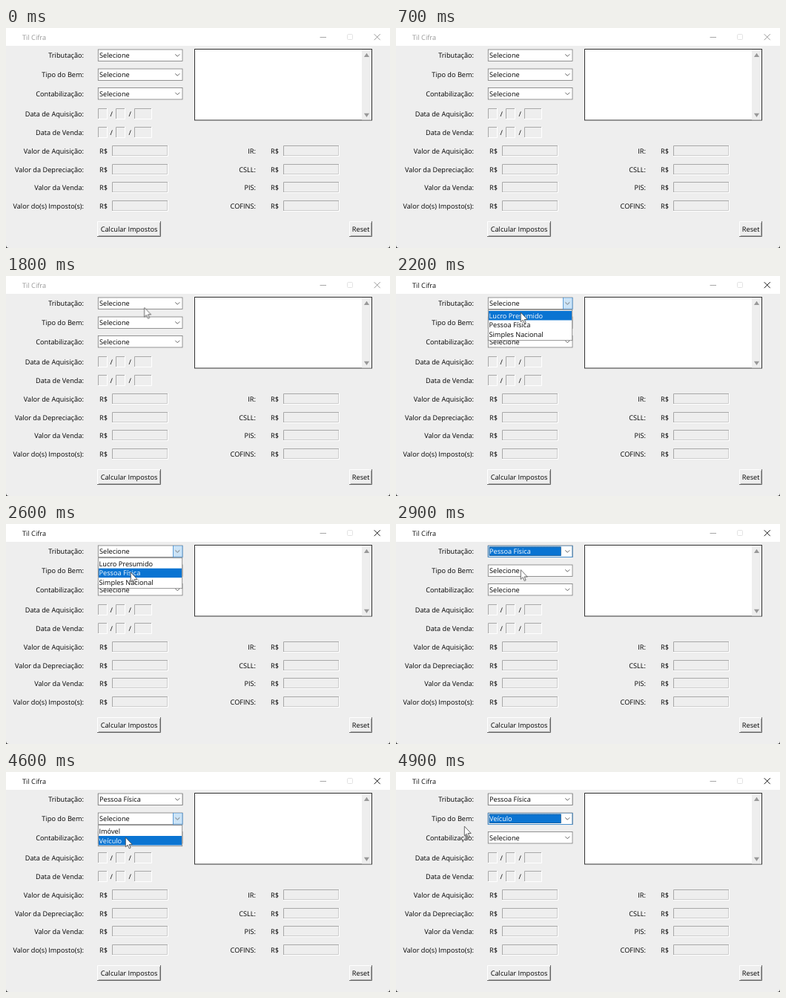
Recreate the animation shown at these times as an HTML page. Size 518x296 px, loop 5000 ms.

```html
<!DOCTYPE html>
<html lang="pt">
<head>
<meta charset="utf-8">
<title>Til Cifra</title>
<style>
html, body { margin: 0; width: 100%; height: 100%; overflow: hidden; background: #333; }
svg { display: block; width: 518px; height: 296px; }
text { font: 9.2px "Open Sans", "Noto Sans", sans-serif; text-rendering: geometricPrecision; }
.right { text-anchor: end; }
.line { fill: none; stroke-width: 1; }
.white { fill: #fff; }
.blue { fill: #0a74d2; }
.box { fill: #fff; stroke: #7a7a7a; stroke-width: .8; }

/* One loop: 2% = 100 ms */
.on { opacity: 0; animation: 5s step-end infinite; }
.open1 { animation-name: open1; }
.row1 { animation-name: row1; }
.row2 { animation-name: row2; }
.picked1 { animation-name: picked1; }
.kept1 { animation-name: kept1; }
.open2 { animation-name: open2; }
.row3 { animation-name: row3; }
.row4 { animation-name: row4; }
.picked2 { animation-name: picked2; }
@keyframes open1 { 0%, 54%, 100% { opacity: 0 } 40% { opacity: 1 } }
@keyframes row1 { 0%, 46%, 100% { opacity: 0 } 40% { opacity: 1 } }
@keyframes row2 { 0%, 54%, 100% { opacity: 0 } 46% { opacity: 1 } }
@keyframes picked1 { 0%, 70%, 100% { opacity: 0 } 54% { opacity: 1 } }
@keyframes kept1 { 0% { opacity: 0 } 70%, 100% { opacity: 1 } }
@keyframes open2 { 0%, 94%, 100% { opacity: 0 } 70% { opacity: 1 } }
@keyframes row3 { 0%, 82%, 100% { opacity: 0 } 70% { opacity: 1 } }
@keyframes row4 { 0%, 94%, 100% { opacity: 0 } 82% { opacity: 1 } }
@keyframes picked2 { 0% { opacity: 0 } 94%, 100% { opacity: 1 } }

.bar { color: #999; animation: focus 5s step-end infinite; }
@keyframes focus { 0% { color: #999 } 40%, 100% { color: #111 } }

.cursor { animation: move 5s infinite; }
@keyframes move {
  0% { opacity: 0; transform: translate(240px, 78px); animation-timing-function: step-end }
  26% { opacity: 1; transform: translate(240px, 78px); animation-timing-function: step-end }
  28% { transform: translate(203px, 51px); animation-timing-function: steps(6) }
  40% { transform: translate(178px, 38px); animation-timing-function: steps(2) }
  44% { transform: translate(168px, 49px); animation-timing-function: steps(2) }
  48% { transform: translate(168px, 63px); animation-timing-function: steps(3) }
  54% { transform: translate(168px, 66px); animation-timing-function: steps(2) }
  58% { transform: translate(168px, 61.5px); animation-timing-function: steps(8) }
  74% { transform: translate(166px, 65px); animation-timing-function: steps(4) }
  82% { transform: translate(164px, 85px); animation-timing-function: steps(5) }
  92% { transform: translate(161px, 88px); animation-timing-function: step-end }
  94% { transform: translate(161px, 88px); animation-timing-function: steps(2) }
  98%, 100% { opacity: 1; transform: translate(92px, 73px); animation-timing-function: step-end }
}
</style>
</head>
<body>
<svg viewBox="0 0 518 296">
  <defs>
    <path id="chevron" class="line" stroke="#666" stroke-width=".9" d="M104.3 6.8l3 3 3-3"/>
    <g id="combo">
      <rect class="box" x=".3" y=".5" width="113.7" height="15.5"/>
      <use href="#chevron"/>
    </g>
    <g id="hot">
      <rect x="101.5" y=".5" width="12.5" height="15.5" fill="#cce4f7" stroke="#3c8ad0" stroke-width=".8"/>
      <use href="#chevron"/>
    </g>
    <g id="chosen">
      <use href="#combo"/>
      <rect class="line" x=".3" y=".5" width="113.7" height="15.5" stroke="#4a90cc"/>
      <rect class="blue" x="1.7" y="2" width="97" height="12.5"/>
      <rect class="line" x="2" y="2.5" width="96.5" height="11.5" stroke="#333" stroke-opacity=".6" stroke-dasharray="1 1"/>
    </g>
    <g id="date">
      <path class="line" stroke="#a8a8a8" d="M.5 14V.5H12M24.5 14V.5H37M49.5 14V.5H72"/>
      <path class="line" stroke="#fff" d="M0 14.5H12.5V0M24 14.5H36.5V0M49 14.5H72.5V0"/>
      <text x="16.6" y="10.8">/</text>
      <text x="41.4" y="10.8">/</text>
    </g>
    <g id="money">
      <text x="2" y="11.3">R$</text>
      <path class="line" stroke="#a8a8a8" d="M19.5 15V.5H94"/>
      <path class="line" stroke="#fff" d="M19 14.5H94.5V0"/>
      <path class="line" stroke="#ccc" d="M20 13.5H93.5V1"/>
    </g>
  </defs>

  <path fill="#eee" d="M0 0H518V292Q518 296 514 296H4Q0 296 0 292Z"/>
  <rect class="white" width="518" height="24"/>
  <g class="bar">
    <text x="22" y="15.7" fill="currentColor">Til Cifra</text>
    <path class="line" stroke="currentColor" d="M496.7 8.2l8 8M504.7 8.2l-8 8"/>
  </g>
  <path class="line" stroke="#a6a6a6" d="M423.5 12.5h8.5"/>
  <rect class="line" x="460.5" y="8.5" width="7" height="7" rx="1" stroke="#e2e2e2"/>

  <g class="right">
    <text x="105" y="40.3">Tributação:</text>
    <text x="105" y="66.3">Tipo do Bem:</text>
    <text x="105" y="92">Contabilização:</text>
    <text x="105" y="118.5">Data de Aquisição:</text>
    <text x="105" y="144.2">Data de Venda:</text>
    <text x="105" y="169">Valor de Aquisição:</text>
    <text x="105" y="193.5">Valor da Depreciação:</text>
    <text x="105" y="218.3">Valor da Venda:</text>
    <text x="105" y="243.2">Valor do(s) Imposto(s):</text>
    <text x="337" y="169">IR:</text>
    <text x="337" y="193.5">CSLL:</text>
    <text x="337" y="218.3">PIS:</text>
    <text x="337" y="243.2">COFINS:</text>
  </g>

  <use href="#date" x="124" y="108"/>
  <use href="#date" x="124" y="133"/>
  <use href="#money" x="124" y="158"/>
  <use href="#money" x="124" y="183"/>
  <use href="#money" x="124" y="207"/>
  <use href="#money" x="124" y="232"/>
  <use href="#money" x="355" y="158"/>
  <use href="#money" x="355" y="183"/>
  <use href="#money" x="355" y="207"/>
  <use href="#money" x="355" y="232"/>

  <rect x="254.5" y="28.5" width="239" height="95.5" fill="#fff" stroke="#333"/>
  <rect x="480" y="29" width="13" height="94.5" fill="#eee"/>
  <path fill="#999" d="M486.5 33.8l3.6 5.2h-7.2zM486.5 120l3.6-5.2h-7.2z"/>

  <g class="line">
    <path stroke="#fff" d="M123.5 281V260.5H209M463.5 281V260.5H494"/>
    <path stroke="#a8a8a8" d="M125 279.5H207.5V262M465 279.5H492.5V262"/>
    <path stroke="#666" d="M123 280.5H208.5V260M463 280.5H493.5V260"/>
  </g>
  <text x="127.7" y="274">Calcular Impostos</text>
  <text x="466.8" y="274">Reset</text>

  <g transform="translate(124 80)">
    <use href="#combo"/>
    <text x="2" y="12">Selecione</text>
  </g>

  <g transform="translate(124 54.5)">
    <use href="#combo"/>
    <text x="2" y="11.9">Selecione</text>
    <use class="on open2" href="#hot"/>
    <g class="on picked2">
      <use href="#chosen"/>
      <text class="white" x="2" y="11.9">Veículo</text>
    </g>
  </g>

  <g transform="translate(124 28.5)">
    <use href="#combo"/>
    <text x="2" y="11.9">Selecione</text>
    <use class="on open1" href="#hot"/>
    <g class="on picked1">
      <use href="#chosen"/>
      <text class="white" x="2" y="11.9">Pessoa Física</text>
    </g>
    <g class="on kept1">
      <use href="#combo"/>
      <text x="2" y="11.9">Pessoa Física</text>
    </g>
  </g>

  <g class="on open1">
    <rect class="box" x="124.3" y="45.7" width="113.4" height="41"/>
    <text x="125.5" y="56.6">Lucro Presumido</text>
    <text x="125.5" y="69.4">Pessoa Física</text>
    <text x="125.5" y="82.2">Simples Nacional</text>
    <g class="on row1">
      <rect class="blue" x="125" y="47" width="112" height="12.5"/>
      <text class="white" x="125.5" y="56.6">Lucro Presumido</text>
    </g>
    <g class="on row2">
      <rect class="blue" x="125" y="59.7" width="112" height="12.5"/>
      <text class="white" x="125.5" y="69.4">Pessoa Física</text>
    </g>
  </g>

  <g class="on open2">
    <rect class="box" x="124.3" y="71.7" width="113.4" height="28"/>
    <text x="125.5" y="82.8">Imóvel</text>
    <text x="125.5" y="95.6">Veículo</text>
    <g class="on row3">
      <rect class="blue" x="125" y="73" width="112" height="12.7"/>
      <text class="white" x="125.5" y="82.8">Imóvel</text>
    </g>
    <g class="on row4">
      <rect class="blue" x="125" y="86" width="112" height="12.5"/>
      <text class="white" x="125.5" y="95.6">Veículo</text>
    </g>
  </g>

  <path class="cursor" fill="#fff" stroke="#444" stroke-width=".8" d="M.3 0V12.8L3.2 10.2 5.2 14.9 7.2 14 5.2 9.5H9.2Z"/>
</svg>
</body>
</html>
```
